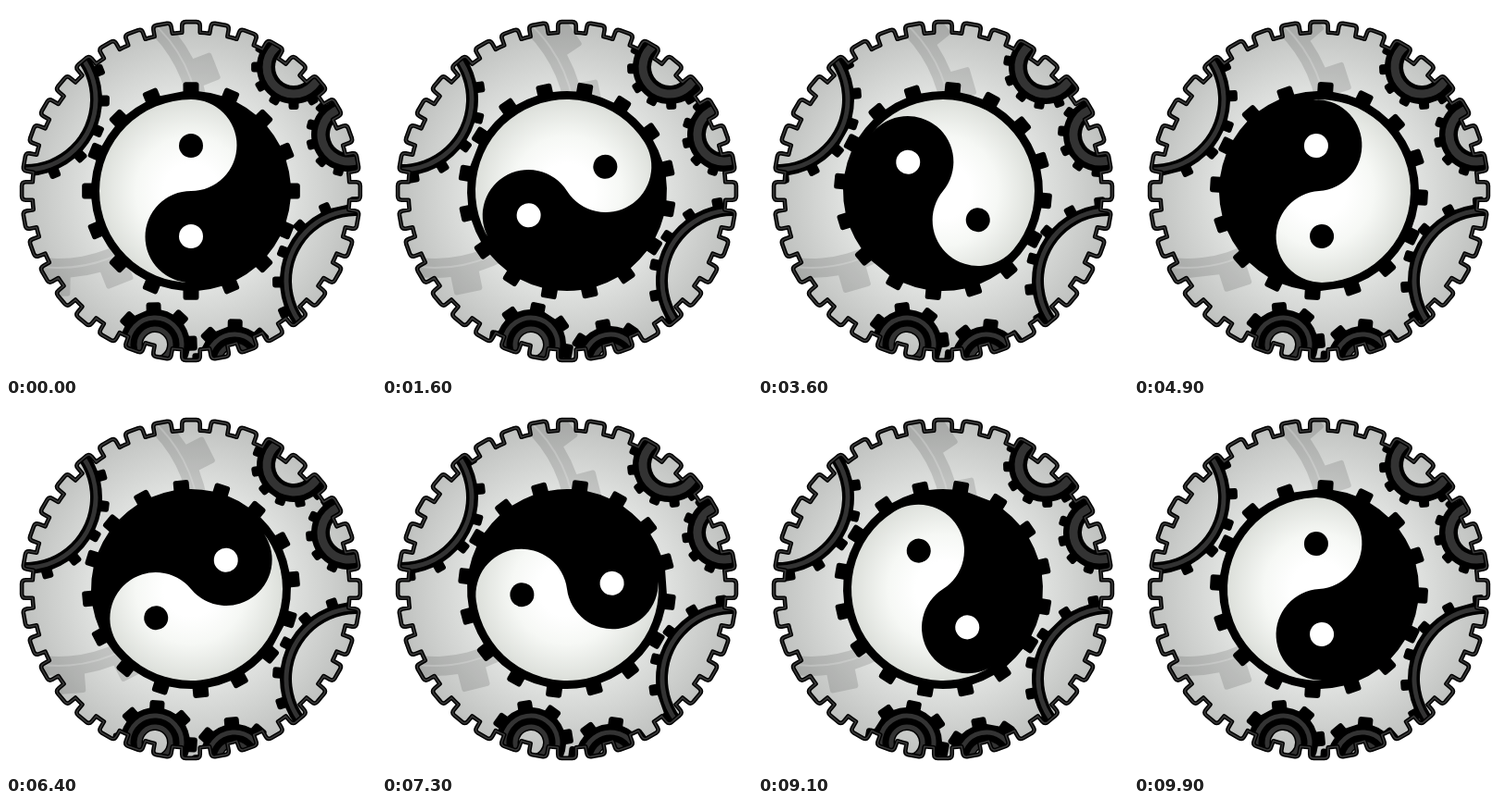
These frames come from a looping animation (400x400 px, 10 s). An HTML page:

```html
<!DOCTYPE html>
<html lang="en">
<head>
<meta charset="utf-8">
<title>Yin yang gears</title>
<style>
  html, body { margin: 0; width: 100%; height: 100%; overflow: hidden; background: #fff; }
  svg { display: block; width: 100%; height: 100%; }
</style>
</head>
<body>
<svg viewBox="0 0 400 400">
  <defs>
    <radialGradient id="plate" gradientUnits="userSpaceOnUse" cx="200" cy="200" r="185">
      <stop offset="0" stop-color="#f8faf8"/>
      <stop offset=".55" stop-color="#e2e4e2"/>
      <stop offset="1" stop-color="#bec0be"/>
    </radialGradient>
    <radialGradient id="pearl" gradientUnits="userSpaceOnUse" cx="0" cy="0" r="99">
      <stop offset=".3" stop-color="#fff"/>
      <stop offset=".6" stop-color="#f6f8f5"/>
      <stop offset="1" stop-color="#dcdfda"/>
    </radialGradient>
    <clipPath id="inside"><path class="rim" transform="translate(200 200)"/></clipPath>
  </defs>
  <g clip-path="url(#inside)">
    <rect width="400" height="400" fill="url(#plate)"/>
    <g id="gears"></g>
  </g>
  <g transform="translate(200 200)" fill="none" stroke-linejoin="round">
    <path class="rim" stroke="#000" stroke-width="4.6"/>
    <path class="rim" stroke="#383838" stroke-width="1.6"/>
  </g>
  <g id="symbol">
    <circle r="99"/>
    <path fill="url(#pearl)" d="M0-99A99 99 0 0 0 0 99A49.5 49.5 0 0 1 0 0A49.5 49.5 0 0 0 0-99Z"/>
    <circle cy="-49" r="13"/>
    <circle cy="49" r="13" fill="#fff"/>
  </g>
</svg>
<script>
const LOOP = 10000, STEP = 100;

// Closed outline with rounded teeth of the given width; the first tooth points up.
function gearPath(teeth, root, tip, width, corner = 2.5) {
  let d = '';
  for (let i = 0; i < teeth; i++) {
    const mid = i / teeth * 2 * Math.PI, half = width / 2;
    const point = (r, x) => {
      const a = mid + Math.asin(x / r);
      return (r * Math.sin(a)).toFixed(2) + ' ' + (-r * Math.cos(a)).toFixed(2);
    };
    d += `${i ? `A${root} ${root} 0 0 1 ` : 'M'}${point(root, -half)}` +
      `L${point(tip - corner, -half)}Q${point(tip, -half)} ${point(tip, corner - half)}` +
      `L${point(tip, half - corner)}Q${point(tip, half)} ${point(tip - corner, half)}` +
      `L${point(root, half)}`;
  }
  return d + 'Z';
}

const circlePath = r => `M${-r} 0A${r} ${r} 0 1 0 ${r} 0A${r} ${r} 0 1 0 ${-r} 0Z`;

// Bands are [radius, line width] rings drawn over the gear body.
const big = { teeth: 16, root: 83, tip: 91, width: 12, hole: 70, bands: [[76, 5]] };
const small = { teeth: 12, root: 40, tip: 46, width: 11, hole: 20, bands: [[29, 9]] };
const low = { teeth: 8, root: 38, tip: 46, width: 16, hole: 13, bands: [[29, 5], [17, 5]] };
const gears = [
  { x: 57, y: 131, teeth: 16, root: 163, tip: 183, width: 31, hole: 142, bands: [[152, 2]],
    color: 'rgba(0,0,0,.13)', bandColor: 'rgba(255,255,255,.2)', dir: -1, phase: 1 },
  { ...big, x: 21, y: 101, dir: 1, phase: 1 },
  { ...big, x: 379, y: 297, dir: 1, phase: -1 },
  { ...small, x: 311, y: 66, dir: 1, phase: 0 },
  { ...small, x: 370, y: 139, dir: -1, phase: 15 },
  { ...low, x: 161, y: 366, dir: 1, phase: -2 },
  { ...low, x: 247, y: 384, dir: -1, phase: 1 },
  { x: 200, y: 200, teeth: 16, root: 108, tip: 118, width: 17, bands: [], dir: -1, phase: 0 }
];

function add(parent, tag, attributes) {
  const node = document.createElementNS('http://www.w3.org/2000/svg', tag);
  for (const key in attributes) node.setAttribute(key, attributes[key]);
  return parent.appendChild(node);
}

const layer = document.getElementById('gears');
for (const g of gears) {
  g.node = add(layer, 'g', {});
  add(g.node, 'path', {
    d: gearPath(g.teeth, g.root, g.tip, g.width) + (g.hole ? circlePath(g.hole) : ''),
    'fill-rule': 'evenodd', fill: g.color || '#000'
  });
  for (const [r, width] of g.bands) add(g.node, 'circle', {
    r, fill: 'none', stroke: g.bandColor || '#333', 'stroke-width': width
  });
}

const rim = gearPath(36, 171.5, 183, 19.5, 4);
document.querySelectorAll('.rim').forEach(node => node.setAttribute('d', rim));
const symbol = document.getElementById('symbol');

function draw(time) {
  const angle = Math.floor(time % LOOP / STEP) * STEP / LOOP * 360;
  for (const g of gears) {
    g.node.setAttribute('transform', `translate(${g.x} ${g.y}) rotate(${g.phase + g.dir * angle})`);
  }
  symbol.setAttribute('transform', `translate(200 200) rotate(${angle})`);
}

const start = performance.now();
function tick() {
  draw(performance.now() - start);
  requestAnimationFrame(tick);
}
tick();
</script>
</body>
</html>
```
